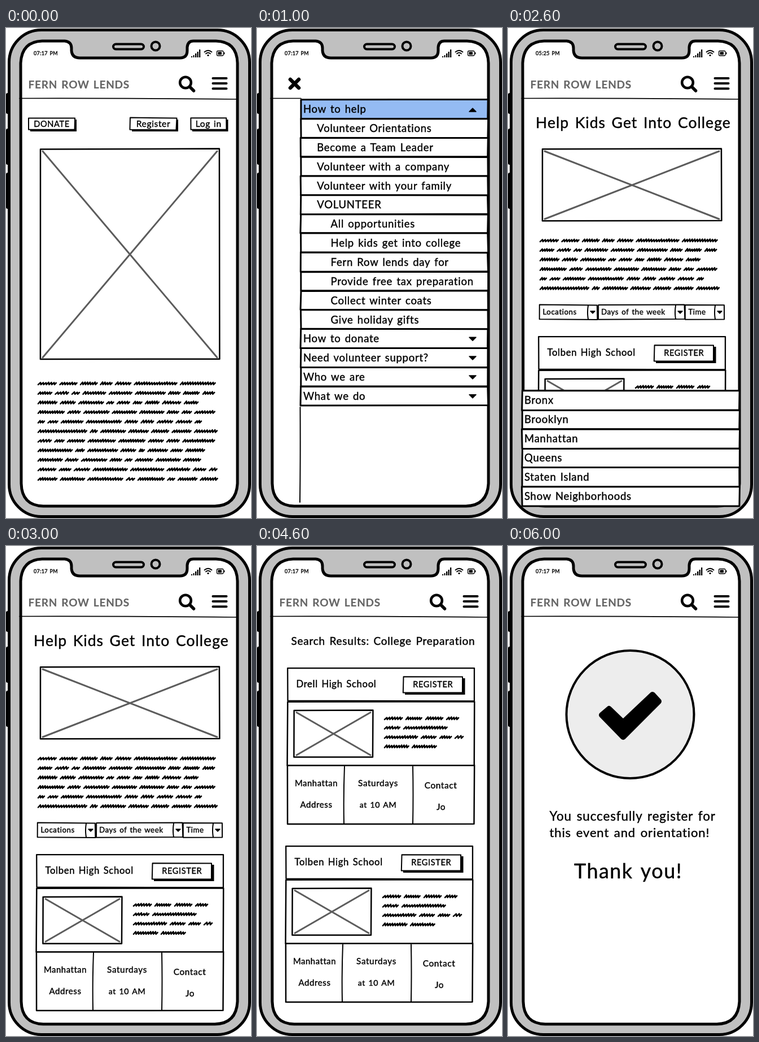
An HTML page that plays this animation: 434x867 px, repeating every 7 s.

```html
<!DOCTYPE html>
<html lang="en">
<head>
<meta charset="utf-8">
<title>Volunteer app wireframe</title>
<style>
html, body { margin: 0; width: 100%; height: 100%; overflow: hidden; background: #fff; }
svg { display: block; width: 434px; height: 867px; }
text {
  font-family: Lato, "Open Sans", sans-serif;
  letter-spacing: .04em; word-spacing: .1em;
  fill: #000; stroke: #000; stroke-width: .4; stroke-linejoin: round;
  white-space: pre;
}
.brand { font-weight: 700; fill: #666; stroke: #666; stroke-width: .2; }
.mid { text-anchor: middle; }
.line { fill: none; stroke: #000; stroke-linecap: round; stroke-linejoin: round; }
.gray { stroke: #5c5c5c; stroke-width: 3; }
.screen { visibility: hidden; animation: show 7s step-end infinite; animation-delay: calc(var(--i) * 1s - 7s); }
.screen:nth-of-type(1) { animation-delay: 0s; }
@keyframes show {
  0% { visibility: visible; }
  14.28571%, 100% { visibility: hidden; }
}
</style>
</head>
<body>
<svg id="stage" viewBox="0 0 434 867" xmlns="http://www.w3.org/2000/svg"></svg>
<script>
// Small repeatable offset that gives lines a hand-drawn look
const wob = n => { const v = Math.sin(n * 12.9898) * 43758.5453; return (v - Math.floor(v) - .5) * 1.2; };

const text = (x, y, size, str, cls = '') =>
  `<text x="${x}" y="${y}" font-size="${size}" class="${cls}">${str}</text>`;
const mid = (x, y, size, str) => text(x, y, size, str, 'mid');
const line = (d, w = 2, cls = '') => `<path class="line ${cls}" stroke-width="${w}" d="${d}"/>`;
const solid = d => `<path stroke="#000" stroke-width="1.5" stroke-linejoin="round" d="${d}"/>`;

function box(x1, y1, x2, y2, w = 2.5, fill = '#fff') {
  const p = [[x1, y1], [x2, y1], [x2, y2], [x1, y2]]
    .map(([x, y], i) => `${(x + wob(x1 + y1 + i)).toFixed(2)} ${(y + wob(x2 + y2 + i * 7)).toFixed(2)}`);
  return `<path d="M${p.join('L')}Z" fill="${fill}" stroke="#000" stroke-width="${w}" stroke-linejoin="round"/>`;
}

const image = (x1, y1, x2, y2) => box(x1, y1, x2, y2) +
  line(`M${x1 + 4} ${y1 + 4}L${x2 - 4} ${y2 - 3}M${x2 - 4} ${y1 + 4}L${x1 + 4} ${y2 - 3}`, 3, 'gray');

const button = (x1, y1, x2, y2, size, label, base, depth = 3) =>
  `<path d="M${x1 + 3} ${y1 + 3}H${x2 + depth}V${y2 + depth}H${x1 + 3}Z"/>` +
  box(x1, y1, x2, y2, 2) + mid((x1 + x2) / 2, base, size, label);

const down = (x, y, r, h) => solid(`M${x - r} ${y - h / 2}H${x + r}L${x} ${y + h / 2}Z`);

// Greeked text: each row is a string of word lengths
function scribble(x, y, rows, gap, step = 16.9) {
  let d = '';
  rows.forEach((row, r) => {
    let at = x;
    for (const len of row.split(' ').map(Number)) {
      const n = Math.max(2, Math.round((len - 3) / 4.5)), s = (len - 3) / n;
      d += `M${at.toFixed(1)} ${(y + r * step + 2).toFixed(1)}`;
      for (let i = 0; i < n; i++) {
        const h = 4 + wob(at + r * 31 + i * 3);
        d += `l${(s * .87).toFixed(1)} ${-h.toFixed(1)}l${(s * .13).toFixed(1)} ${h.toFixed(1)}`;
      }
      d += 'l3 -3';
      at += len + gap;
    }
  });
  return line(d, 2.5);
}

const prose = [
  '32 30 29 20 27 75 62', '24 23 13 40 40 52 20 28 20', '33 26 43 12 22 15 24 32 24',
  '46 22 44 42 42 20 16 35', '11 17 38 62 22 22 27 27 11', '86 12 43 34 30 33 40',
  '23 16 30 48 46 26 22 56', '60 15 52 26 9 34 20 33', '42 22 44 20 12 30 42 30',
  '31 20 27 60 58 40 22 13', '33 42 62 14 46 12 33 30'
];
const blurb = ['31 28 30 21', '27 76', '58 26 20 14', '42 42'];

const phone = () =>
  [[115, 152], [178, 242], [256, 320]].map(([a, b]) => `<rect x="0" y="${a}" width="8" height="${b - a}" rx="3"/>`).join('') +
  `<rect x="5.5" y="3.5" width="426" height="861" rx="57" fill="#c0c0c0" stroke="#000" stroke-width="5"/>
  <path fill="#fff" stroke="#000" stroke-width="5" stroke-linejoin="round" d="M26 62Q28 24 64 23H104Q116 24 116 36V40Q117 53 131 53H308Q321 53 321 40V34Q322 23 332 23H372Q409 24 410 62V806Q408 845 370 846H66Q28 845 27 806Z"/>
  <rect x="190" y="28.5" width="54" height="9" rx="4.5" fill="#c0c0c0" stroke="#000" stroke-width="4"/>
  <circle cx="265" cy="32" r="7.5" fill="#c0c0c0" stroke="#000" stroke-width="4"/>
  <path d="M328 50h2v2h-2zM331.500 48h2v4h-2zM335 45h2.300v7h-2.300zM338.500 42h2.300v10h-2.300zM342 38h2.300v14h-2.300z"/>` +
  line('M351.500 42.500Q358 37 364.500 42.500M354 45.500Q358 42 362 45.500', 1.8) +
  `<circle cx="358" cy="48.300" r="1.600"/>
  <rect x="373.500" y="40.500" width="11.500" height="8.500" rx="2" fill="none" stroke="#000" stroke-width="1.300"/>
  <path d="M375.500 42.300h6.500v5h-6.500zM386 43h1.500v3.500H386z"/>`;

const clock = t => text(49, 48, 9, t);

const head = (t = '07:17 PM') => clock(t) + text(39.5, 107, 19, 'FERN ROW LENDS', 'brand') +
  '<circle cx="318" cy="96.500" r="9.800" class="line" stroke-width="4.600"/>' +
  line('M326 104.500L332.500 111', 5.5) +
  line('M366.500 89H390.500M366.500 98H390.500M366.500 107.300H390.500', 4) +
  line('M24 124.500Q200 124 408 126', 1.6);

function card(dx, dy, school) {
  return `<g transform="translate(${dx} ${dy})">` +
    box(54, 718, 385, 822) + line('M155 720Q153 770 154 821M276 720Q277 770 276 821') +
    box(54, 606, 385, 718.5) + box(54, 546, 385, 604, 2.3) +
    text(69.5, 580, 16.7, school) +
    button(259, 561, 364.5, 589, 14.6, 'REGISTER', 580, 4) +
    image(66, 620.5, 205, 703) + scribble(226, 635, blurb, 7, 16.6) +
    mid(105, 755, 14.8, 'Manhattan') + mid(105, 793, 15, 'Address') +
    mid(214.5, 755, 15.3, 'Saturdays') + mid(214.5, 793, 14.2, 'at 10 AM') +
    mid(325.5, 759, 15.4, 'Contact') + mid(326, 797, 15.4, 'Jo') + '</g>';
}

const select = (x1, x2, cut, label, tx) => box(x1, 490, x2, 515.5, 2) +
  line(`M${cut} 491Q${cut - 2} 503 ${cut} 515`) + text(tx, 507, 13.3, label) + down((cut + x2) / 2, 503, 4, 4);

const program = t => head(t) + text(49, 177, 26.5, 'Help Kids Get Into College') +
  image(61, 214, 378, 341) + scribble(57, 376, prose.slice(0, 6), 6.5) +
  select(56, 158, 142, 'Locations', 61.5) + select(160, 313, 297, 'Days of the week', 165) +
  select(314, 383, 367, 'Time', 319.5) + card(0, 0, 'Tolben High School');

const home = () => head() +
  button(40, 159, 122, 180, 14.6, 'DONATE', 175) +
  button(220, 159, 302, 180, 15.6, 'Register', 175) +
  button(327, 159, 390.5, 180, 15.6, 'Log in', 175) +
  image(61, 214, 378, 586) + scribble(57, 629, prose, 6.5);

function menu() {
  const items = [
    [0, 'How to help'], [1, 'Volunteer Orientations'], [1, 'Become a Team Leader'],
    [1, 'Volunteer with a company'], [1, 'Volunteer with your family'], [1, 'VOLUNTEER'],
    [2, 'All opportunities'], [2, 'Help kids get into college'], [2, 'Fern Row lends day for'],
    [2, 'Provide free tax preparation'], [2, 'Collect winter coats'], [2, 'Give holiday gifts'],
    [0, 'How to donate'], [0, 'Need volunteer support?'], [0, 'Who we are'], [0, 'What we do']
  ];
  return clock('07:17 PM') + line('M59 91L74 106M74 91L59 106', 6.5) + line('M24 124.500H78', 1.6) +
    line('M76.500 671Q77 760 76 839', 2) +
    items.map(([level, label], i) => {
      const y = 126.5 + i * 33.85;
      const mark = i === 0 ? solid('M376 148H388L382 142Z') : level === 0 ? down(382, y + 17.5, 6, 6) : '';
      return box(77.5, y, 409, y + 33.85, 3, i ? '#fff' : '#94bbf3') +
        text(82 + level * 24.3, (y + 23.6).toFixed(1), 18.5, label) + mark;
    }).join('');
}

const picker = () => program('05:25 PM') +
  ['Bronx', 'Brooklyn', 'Manhattan', 'Queens', 'Staten Island', 'Show Neighborhoods'].map((s, i) => {
    const y = 642 + i * 34;
    return box(25, y, 410, y + 34, 3) + text(29, y + 23, 18.5, s);
  }).join('');

const results = () => head() + text(60.5, 175, 19, 'Search Results: College Preparation') +
  card(0, -330, 'Drell High School') + card(-3, -15, 'Tolben High School');

function signup() {
  const intro = ['Before you can register from this volunteer', 'opportunity, we would like you to attend a',
    'volunteer orientation to learn how to succeed', 'in this role and make the greatest impact.'];
  const slots = [[586, 'Nov 5th at 10 AM'], [645, 'Nov 12th at 1 PM'], [703, 'Nov 20th at 2 PM']];
  return head() +
    `<g clip-path="url(#edge)">${text(49, 185, 18.6, 'College Preparation at Drell High Schoo')}</g>` +
    intro.map((s, i) => text(52.5, 222 + i * 19, 14.9, s)).join('') +
    box(54, 311, 385, 509) + line('M54 345H385', 2.5) + text(58, 334, 18.4, 'Form') +
    text(76.5, 396, 15, 'Name:') + line('M132 396.500Q240 397 350 398', 1.8) +
    text(76.5, 464, 15, 'Email:') + line('M132 464.500Q240 465 350 466', 1.8) +
    text(52.5, 554, 18.3, 'Orientations') +
    slots.map(([y, s]) => box(54, y, 394, y + 34) + text(60.5, y + 22, 18.4, s) +
      button(297, y + 6, 363.5, y + 27.5, 16, 'Select', y + 22)).join('') +
    text(281, 765, 14.6, 'More options +') +
    button(174, 793, 257, 814, 18.6, 'Submit', 810);
}

const done = () => head() +
  '<circle cx="216.500" cy="298" r="113" fill="#ededed" stroke="#000" stroke-width="4"/>' +
  '<path d="M166 299L179 288L204 312L256 263L267 275L204 338Z" stroke="#000" stroke-width="10" stroke-linejoin="round"/>' +
  text(73.5, 486, 22.4, 'You succesfully register for') +
  text(73.5, 515, 22, 'this event and orientation!') +
  text(117, 588, 36, 'Thank you!');

const screens = [home, menu, picker, () => program(), results, signup, done];
document.getElementById('stage').innerHTML =
  '<clipPath id="edge"><rect width="408" height="867"/></clipPath>' + phone() +
  screens.map((draw, i) => `<g class="screen" style="--i:${i}">${draw()}</g>`).join('');
</script>
</body>
</html>
```
